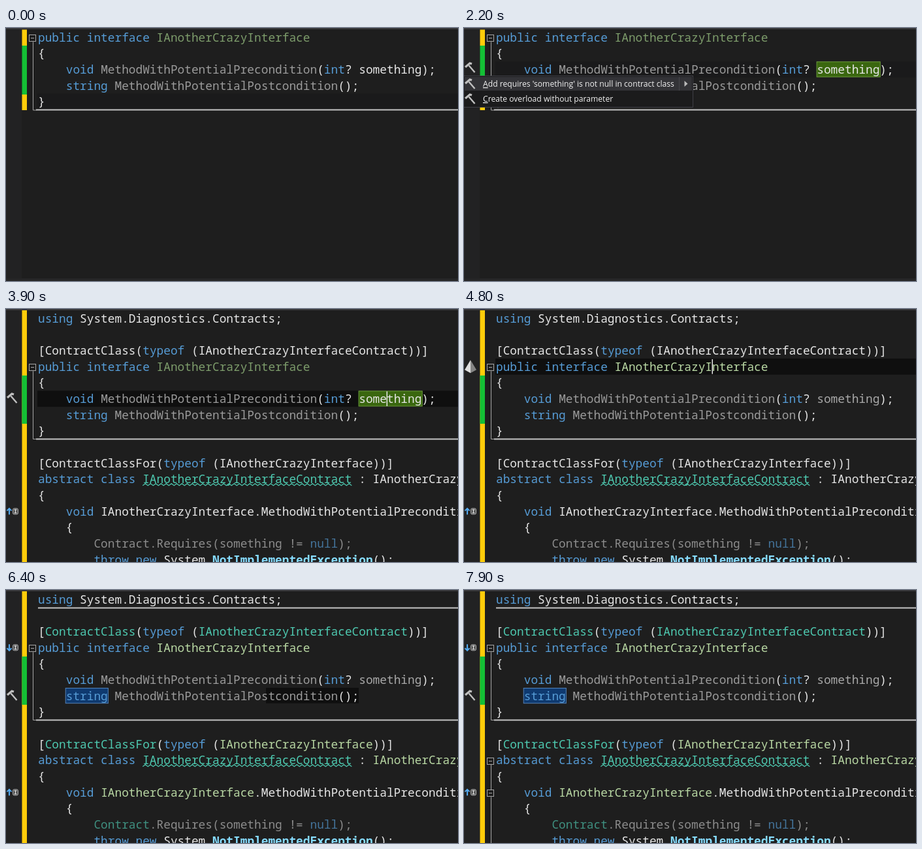
These frames come from a looping animation (692x388 px, 8 s). An HTML page:

```html
<!DOCTYPE html>
<html lang="en">
<head>
<meta charset="utf-8">
<title>Code contract refactoring</title>
<style>
  html, body { margin: 0; width: 100%; height: 100%; overflow: hidden; background: #1e1e1e; }
  svg { display: block; width: 100vw; height: 100vh; }
  .code text { font: 500 17.81px "Noto Sans Mono", monospace; fill: #e6e6e6; white-space: pre; }
  .menu text { font: 12.15px "Open Sans", sans-serif; fill: #f1f1f1; }
  .code .keyword, .code .null { fill: #569cd6; }
  .code .member { fill: #9b9b9b; }
  .code .iface { fill: #7d9c6b; }
  .active .iface, .final .iface, .final .ref { fill: #b8d7a3; }
  .active .param, .final .param { fill: #a8a8a8; }
  .parsed .decl, .active .decl, .final .decl, .final .type { fill: #4ec9b0; }
  .parsed .dim, .active .dim, .final .dim, .parsed .owner, .active .owner { fill: #8c8c8c; }
  .parsed .null, .active .null, .final .null { fill: #44749b; }
  .final .owner { fill: #3f9080; }
  .parsed .error, .active .error, .final .error { fill: #86dcfe; font-weight: 700; }
  .band { fill: #0f0f0f; }
  .soft { fill: #1a1a1b; }
  .usage { fill: #3a670f; stroke: #6d9c3e; }
  .mention { fill: #0f3a70; stroke: #5583b8; }
  .fold { fill: none; stroke: #a5a5a5; }
  .rule { stroke: #c4c4c4; stroke-width: 2; }
  .caret { stroke: #e8e8e8; stroke-width: 1.5; }
</style>
</head>
<body>
<svg id="stage" viewBox="0 0 692 388" preserveAspectRatio="none"></svg>
<script>
const LOOP = 8000, LEFT = 49, CHAR = 10.686, PITCH = 24.67;
const stage = document.getElementById('stage');

const colX = col => LEFT + col * CHAR;
const rowTop = row => 2 + row * PITCH;
const rowMid = row => 14.3 + row * PITCH;

const during = (from, to, markup) => `<g data-from="${from}" data-to="${to}">${markup}</g>`;
const rect = (x, y, w, h, attrs) => `<rect x="${x}" y="${y}" width="${w}" height="${h}" ${attrs}/>`;
const path = (d, attrs) => `<path d="${d}" ${attrs}/>`;
const band = (row, kind = 'band') => rect(48, rowTop(row), 644, PITCH, `class="${kind}"`);
const mark = (row, col, length, kind) =>
  rect(colX(col) - .5, rowTop(row) + .5, length * CHAR + 1, PITCH - 1.5, `class="${kind}"`);
const caret = (row, col) => path(`M${colX(col)} ${rowTop(row) + 1}v${PITCH - 2}`, 'class="caret"');
const change = (y, h, color) => rect(24.5, y, 7.5, h, `fill="${color}"`);
const rule = (y, x = 46) => path(`M${x} ${y}H692`, 'class="rule"');

// Inline notation: <kind:words> colours a run of code.
const code = (lines, kind = '') => `<g class="code ${kind}">` + lines.map((line, row) =>
  `<text x="${LEFT}" y="${20.5 + row * PITCH}">` +
  line.replace(/<(\w+):([^>]*)>/g, '<tspan class="$1">$2</tspan>') + '</text>').join('') + '</g>';

const foldBox = row => {
  const y = Math.round(rowMid(row)) + 1;
  return rect(35.5, y - 4.5, 10, 10, 'class="fold"') + path(`M38 ${y + .5}h5`, 'class="fold"');
};
const foldBlock = (row, endY) =>
  foldBox(row) + path(`M41.5 ${rowMid(row) + 7}V${endY}h5`, 'class="fold"');

const hammer = (x, y) => `<g transform="translate(${x} ${y})" fill="none" stroke="#c0c0c0">` +
  path('M1 8L8 2L11 3', 'stroke-width="3.2"') + path('M6.5 5.5L15.5 16', 'stroke-width="2.4"') + '</g>';
const pyramid = row => `<g transform="translate(10 ${rowMid(row)})">` +
  path('M0 -10L-9 5L0 10Z', 'fill="#dedede"') + path('M0 -10L9 5L0 10Z', 'fill="#858585"') + '</g>';
const inherit = (row, flip) => `<g transform="translate(0 ${rowMid(row)})">` +
  path('M5 5V-4M1.5 -1L5 -4.5L8.5 -1', `fill="none" stroke="#55aaf0" stroke-width="2" transform="scale(1 ${flip})"`) +
  rect(10.5, -4.5, 8, 9, 'rx="2" fill="#555" stroke="#aaa"') +
  path('M12.5 -2.5h4M14.5 -2.5v5M12.5 2.5h4', 'stroke="#eee"') + '</g>';

const squiggle = (row, col, length) => {
  const end = colX(col + length);
  let d = `M${colX(col)} ${rowTop(row) + 22}`;
  for (let x = colX(col), up = 1; x < end - 4; x += 4, up = -up) d += `l4 ${-3 * up}`;
  return path(d, 'fill="none" stroke="#4ec9b0" stroke-width="1.2"');
};

const menuItem = (y, key, label) => hammer(1, y - 9) +
  `<text x="29" y="${y + 4}"><tspan text-decoration="underline">${key}</tspan>${label}</text>`;
const menu = '<g class="menu">' +
  rect(-.5, 73.5, 351, 48, 'fill="#1b1b1c" stroke="#3f3f46"') +
  rect(1, 75, 348, 21, 'fill="#333337"') +
  path('M329.5 75v21', 'stroke="#46464a"') + path('M337.5 81l5 4.5l-5 4.5z', 'fill="#bbb"') +
  menuItem(86, 'A', "dd requires 'something' is not null in contract class") +
  menuItem(109, 'C', 'reate overload without parameter') + '</g>';

const body = [
  '<keyword:public interface> <iface:IAnotherCrazyInterface>',
  '{',
  '    <keyword:void> <member:MethodWithPotentialPrecondition>(<keyword:int>? <param:something>);',
  '    <keyword:string> <member:MethodWithPotentialPostcondition>();',
  '}'
];
const contract = [
  '<keyword:using> System.Diagnostics.Contracts;',
  '',
  '[<type:ContractClass>(<keyword:typeof> (<type:IAnotherCrazyInterfaceContract>))]',
  ...body,
  '',
  '[<type:ContractClassFor>(<keyword:typeof> (<ref:IAnotherCrazyInterface>))]',
  '<keyword:abstract class> <decl:IAnotherCrazyInterfaceContract> : <ref:IAnotherCrazyInterface>',
  '{',
  '    <keyword:void> <ref:IAnotherCrazyInterface>.MethodWithPotentialPrecondition(<keyword:int>? something)',
  '    {',
  '        <owner:Contract><dim:.Requires(something != ><null:null><dim:);>',
  '        <keyword:throw new> System.<error:NotImplementedException>();'
];

const yellow = '#ffcc0a', green = '#14c035';

stage.innerHTML =
  rect(0, 0, 692, 388, 'fill="#1e1e1e"') +
  rect(0, 0, 24, 388, 'fill="#222223"') +
  rect(0, 0, 692, 2, 'fill="#38383b"') +

  during(0, 3200,
    rect(0, 384, 692, 4, 'fill="#262627"') +
    change(2.5, 24.5, yellow) + change(27, 75, green) + change(102, 24, yellow) +
    during(0, 100, band(4, 'soft')) +
    during(100, 3200, band(2, 'soft')) +
    during(1000, 3200, mark(2, 46, 9, 'usage')) +
    foldBlock(0, 126) + rule(125.5) + code(body) +
    during(1200, 3200, hammer(1, 52)) +
    during(1600, 3200, menu)) +

  during(3200, LOOP,
    change(2, 386, yellow) + change(102, 74, green) +
    during(3200, 4200, band(5) + mark(5, 46, 9, 'usage')) +
    during(4200, 5500, band(3)) +
    during(5500, 6300, band(6)) +
    during(6300, 7000, rect(398, rowTop(6), 142, PITCH - 1, 'class="band"')) +
    during(5400, 6300, mark(3, 17, 22, 'usage') + mark(9, 26, 22, 'mention') +
      mark(10, 48, 22, 'mention') + mark(12, 9, 22, 'mention')) +
    during(6300, LOOP, mark(6, 4, 6, 'mention') + rule(27.5, LEFT)) +
    foldBlock(3, 199.5) + rule(199.5) +
    during(7000, LOOP, path(`M41.5 ${rowMid(10) + 7}V${rowMid(12) - 4}M41.5 ${rowMid(12) + 7}V388`, 'class="fold"') +
      foldBox(10) + foldBox(12)) +
    during(3200, 3800, code(contract)) +
    during(3800, 4200, code(contract, 'parsed')) +
    during(4200, 6300, code(contract, 'active')) +
    during(6300, LOOP, code(contract, 'final')) +
    during(3800, LOOP, squiggle(10, 15, 30) + inherit(12, 1)) +
    during(3200, 4200, hammer(1, 128) + caret(5, 50)) +
    during(4200, 6300, pyramid(3)) +
    during(4200, 5500, caret(3, 31)) +
    during(5500, 6300, caret(6, 6)) +
    during(6300, LOOP, inherit(3, -1) + hammer(1, 153)));

const timed = [...stage.querySelectorAll('[data-from]')];
function render(now) {
  const time = now % LOOP;
  for (const { style, dataset } of timed)
    style.display = time >= +dataset.from && time < +dataset.to ? '' : 'none';
}
const begin = performance.now();
(function tick() {
  render(performance.now() - begin);
  requestAnimationFrame(tick);
})();
</script>
</body>
</html>
```
